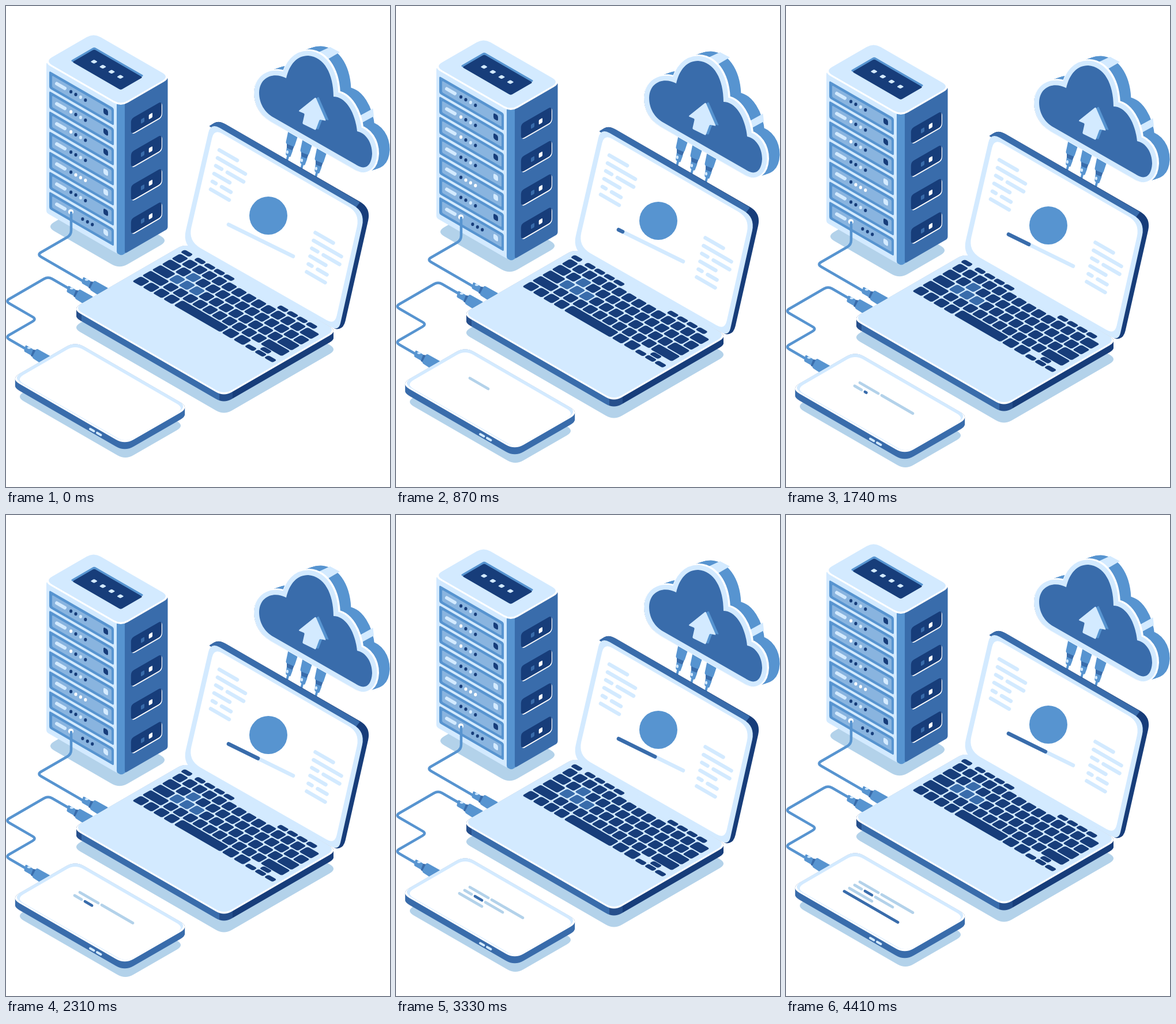
Recreate the animation shown at these times as an HTML page. Size 666 by 833 pixels, loop 4.5 s.

```html
<!DOCTYPE html>
<html lang="en">
<head>
<meta charset="utf-8">
<title>Cloud backup</title>
<style>
@property --t { syntax: "<number>"; inherits: true; initial-value: 0; }
html, body { margin: 0; width: 100%; height: 100%; overflow: hidden; background: #fff; }
svg { display: block; width: 666px; height: 833px; }
#scene { animation: bob 4.5s infinite, clock 4.5s linear infinite; }
.line { fill: none; stroke-linecap: round; stroke-linejoin: round; }
.type, .load { stroke-dasharray: 1 2; }
.type { stroke-dashoffset: calc(1.1 * (1 - clamp(0, (var(--t) - var(--start)) / 150, 1))); }
.load { stroke-dashoffset: 1.1; animation: load 4.5s linear infinite; }
@keyframes clock { from { --t: 0; } to { --t: 4500; } }
/* moves in whole pixels */
@keyframes bob {
  0% { transform: translateY(0); animation-timing-function: step-end; }
  1.333% { transform: translateY(1px); animation-timing-function: steps(19, end); }
  43.556% { transform: translateY(20px); animation-timing-function: step-end; }
  47.222% { transform: translateY(19px); animation-timing-function: steps(19, end); }
  97.889%, 100% { transform: translateY(0); }
}
@keyframes load {
  0%, 15.3% { stroke-dashoffset: 1.1; }
  15.4% { stroke-dashoffset: 1; }
  27.33% { stroke-dashoffset: .812; }
  51.33% { stroke-dashoffset: .545; }
  64.67% { stroke-dashoffset: .482; }
  75.3%, 100% { stroke-dashoffset: .429; }
}
</style>
</head>
<body>
<svg viewBox="0 0 666 833" xmlns="http://www.w3.org/2000/svg">
  <defs>
    <linearGradient id="side" gradientUnits="userSpaceOnUse" x1="121" x2="567" y1="0" y2="0">
      <stop offset=".022" stop-color="#264f8c"/><stop offset=".022" stop-color="#396cab"/>
      <stop offset=".558" stop-color="#396cab"/><stop offset=".558" stop-color="#264f8c"/>
      <stop offset=".61" stop-color="#264f8c"/><stop offset=".61" stop-color="#173d7a"/>
    </linearGradient>
    <path id="cloud" d="M486 125C492 100 505 86 524 86C552 88 568 118 568 157C590 157 606 186 609 217C624 220 635 236 635 256C634 276 624 284 611 277L464 193C448 184 439 168 439 150C440 122 465 114 486 125Z"/>
  </defs>
  <g id="scene"></g>
</svg>
<script>
const WHITE = '#fff', LIGHT = '#d3eaff', MID = '#5794d0', BLUE = '#396cab',
  DARK = '#173d7a', SHADE = '#b3d2ea', PANEL = '#89b4df', ISO = .577;
let layer = document.getElementById('scene');

function add(tag, attrs) {
  const node = document.createElementNS('http://www.w3.org/2000/svg', tag);
  for (const k in attrs) node.setAttribute(k, attrs[k]);
  layer.appendChild(node);
  return node;
}

function group(x, y, draw) {
  const parent = layer;
  layer = add('g', { transform: `translate(${x} ${y})` });
  draw();
  layer = parent;
}

function repeat(n, dx, dy, draw) {
  for (let i = 0; i < n; i++) group(i * dx, i * dy, () => draw(i));
}

// Path with rounded corners; a point may carry its own radius.
function rounded(pts, r, open = false) {
  const n = pts.length;
  const toward = (p, q, d) => {
    const k = Math.min(d / Math.hypot(q[0] - p[0], q[1] - p[1]), .5);
    return (p[0] + (q[0] - p[0]) * k) + ' ' + (p[1] + (q[1] - p[1]) * k);
  };
  return pts.map((p, i) => {
    const cmd = i ? 'L' : 'M', rad = p[2] ?? r;
    if (open && (i === 0 || i === n - 1)) return `${cmd}${p[0]} ${p[1]}`;
    return `${cmd}${toward(p, pts[(i + n - 1) % n], rad)}Q${p[0]} ${p[1]} ${toward(p, pts[(i + 1) % n], rad)}`;
  }).join('') + (open ? '' : 'Z');
}

const poly = (fill, r, pts) => add('path', { d: rounded(pts, r), fill });

// Upright parallelogram on a wall of slope s.
const slab = (fill, x, y, w, h, s, r) =>
  poly(fill, r, [[x, y], [x + w, y + w * s], [x + w, y + w * s + h], [x, y + h]]);

// Lying rectangle: top corner, reach to the right, reach to the left.
const tile = (fill, x, y, a, b, r) =>
  poly(fill, r, [[x, y], [x + a, y + a * ISO], [x + a - b, y + (a + b) * ISO], [x - b, y + b * ISO]]);

// Lit tile with a white front edge.
function lid(x, y, a, b, r) {
  tile(WHITE, x, y, a, b, r);
  tile(LIGHT, x, y, a - 3, b - 3, r);
}

const line = (stroke, width, d, cls = '') =>
  add('path', { class: 'line ' + cls, d, stroke, 'stroke-width': width, pathLength: 1 });

const isoLine = (stroke, width, x, y, len, cls) =>
  line(stroke, width, `M${x} ${y}l${len} ${len * ISO}`, cls);

const dot = (fill, cx, cy, rx, ry = rx) => add('ellipse', { cx, cy, rx, ry, fill });

// Zigzag along the isometric axes through the given x positions.
function cable(x, y, turns, first) {
  const pts = [...first, [x, y]];
  turns.forEach(to => { y += Math.abs(to - x) * ISO; x = to; pts.push([x, y]); });
  line(MID, 4.5, rounded(pts, 8, true));
}

function plug(x, y) {
  group(x, y, () => {
    poly(MID, 2, [[134, 469], [148, 477], [145, 488], [131, 480]]);
    poly(BLUE, 0, [[147, 477], [154, 478], [148, 491], [143, 488]]);
    poly(MID, 3, [[153, 475], [178, 489], [160, 501], [145, 491]]);
    dot(LIGHT, 140, 474, 3.2, 1.8);
  });
}

function server() {
  tile(SHADE, 155, 333, 127, 85, 16);
  slab(LIGHT, 70, 97, 124, 261, ISO, 4);
  poly(MID, 3, [[192, 160], [208, 160], [208, 428], [200, 432], [192, 428]]);
  slab(BLUE, 206, 166, 74.5, 263, -ISO, 4);
  lid(152, 47, 134, 87, 14);
  tile(MID, 153, 71, 86, 41, 3);
  tile(DARK, 153, 75, 84, 38, 3);
  repeat(4, 15.2, 8.75, () => tile(LIGHT, 152.7, 92.8, 6.2, 6.2, 1.5));

  const leds = ['ddld', 'wdld', 'wdld', 'ddld', 'dwww', 'ddld', ' ddd'];
  const tone = { d: DARK, l: LIGHT, w: WHITE };
  repeat(7, 0, 34.8, row => {
    slab(MID, 75, 112.5, 112, 30, ISO, 3);
    slab(PANEL, 80, 120.5, 103, 20, ISO, 2);
    isoLine(LIGHT, 6, 88, 134.5, 14);
    const x = row < 6 ? 112.6 : 124.5, y = 148.5 + (x - 112.6) * ISO;
    [...leds[row]].forEach((c, k) => c in tone && dot(tone[c], x + k * 8.4, y + k * 4.8, 2.6, 3));
    slab(row === 5 || row < 3 ? DARK : LIGHT, 169, 176, 8, 10, ISO, 3);
  });

  repeat(4, 0, 57.8, () => {
    slab(WHITE, 218, 196.5, 53, 27, -ISO, 7);
    slab(DARK, 216.8, 195.5, 53, 26.5, -ISO, 6);
    slab(BLUE, 234, 196.5, 6, 7.5, -ISO, 1.5);
    slab(WHITE, 247.7, 188.5, 6.3, 8, -ISO, 1.5);
  });
}

function cables() {
  dot(WHITE, 112.5, 356.5, 4.6);
  cable(113, 396.5, [54, 138], [[113, 358]]);
  cable(73, 468.5, [-1, 53, -1, 38], [[112, 491]]);
  plug(0, 0);
  plug(-26, 15);
  plug(-100, 118);
}

function keyboard() {
  const end = 242, pitch = 17;
  const key = (a, b, w, h = 15, fill = DARK) =>
    tile(fill, 312 + a - b, 423 + ISO * (a + b), w, h, 3.5);
  const small = (a, b) => key(a, b, 14.7, 7.5);

  small(-2, 0);
  for (let i = 0; i < 4; i++) {
    small(21 + i * 16.7, 0);
    small(164.5 + i * 16.7, 0);
    key(i * 17.8, 78, 15.5);
  }
  for (let row = 0; row < 4; row++) {
    const b = 10 + row * pitch, first = 14.5 + row * 6, count = 12 - Math.max(0, row - 1);
    let a = first + 2.5;
    key(0, b, first);
    for (let i = 0; i < count; i++, a += pitch) {
      const lit = row === 1 && i === 1 || row === 2 && i < 3;
      key(a, b, 14.8, 15, lit ? BLUE : DARK);
    }
    key(a, b, end - a);
  }
  key(72, 78, 80.5);
  key(155, 78, 17);
  key(175, 78, 17);
  for (let i = 0; i < 3; i++) small(195 + i * pitch, 86);
  small(212, 77);
}

function paragraph() {
  [[31], [48], [10, 28], [27], [6, 16], [32]].forEach((words, row) => {
    let x = 370 - row * 3, y = 249.5 + row * 13.6;
    words.forEach(len => {
      isoLine(LIGHT, 6.5, x, y, len);
      x += len + 10;
      y += (len + 10) * ISO;
    });
  });
}

function laptop() {
  const base = [312, 411, 263, 197, 16];
  group(0, 32, () => tile(SHADE, ...base));
  repeat(13, 0, 1, () => tile('url(#side)', ...base));
  lid(...base);
  keyboard();

  poly(DARK, 8, [[354, 207, 4], [369, 198, 14], [633, 350, 22], [586, 557, 12], [570, 561]]);
  poly(BLUE, 2, [[352, 208], [369, 198, 14], [614, 340], [606, 350]]);
  poly(LIGHT, 20, [[355, 202, 18], [623, 357, 24], [577, 563, 14], [306, 414, 26]]);
  poly(WHITE, 20, [[361, 213, 16], [614, 359, 24], [570, 552, 16], [316, 407, 24]]);

  paragraph();
  group(166.5, 143, paragraph);
  dot(MID, 455, 363, 33);
  const bar = 'M386 378.5L498 433.5';
  line(LIGHT, 6.5, bar);
  line(BLUE, 6.5, bar, 'load');
}

function phone() {
  const body = [120, 581, 198, 112, 18], screen = [120, 587, 190, 103, 16];
  group(0, 30, () => tile(SHADE, ...screen));
  repeat(13, 0, 1, () => tile(BLUE, ...body));
  lid(...body);
  tile(WHITE, ...screen);
  repeat(2, 12, 6.7, () => isoLine(LIGHT, 4, 146, 732.5, 6.5));

  // rows of words: [length, time it is typed]
  [
    [[32, 660], [54, 1000]],
    [[12, 1350], [12, 1700], [30, 2550]],
    [[39, 3100]],
    [[93, 3840]]
  ].forEach((words, row) => {
    let x = 128 - row * 9, y = 635.5 + row * 5.4;
    words.forEach(([len, start], i) => {
      const accent = row === 3 || row === 1 && i === 1;
      isoLine(accent ? BLUE : SHADE, 4.8, x, y, len, 'type').style.setProperty('--start', start);
      x += len + 6;
      y += (len + 6) * ISO;
    });
  });
}

function cloudCables() {
  repeat(3, 25, 14.3, () => {
    line(MID, 4, 'M490 257L486 272');
    poly(MID, 2, [[487, 244], [498, 249], [493, 262], [485, 258]]);
    poly(BLUE, 1, [[487, 237], [500, 242], [497, 250], [487, 246]]);
    poly(MID, 3, [[490, 214], [507, 223], [500, 244], [485, 238]]);
    dot(LIGHT, 488, 253, 2, 3);
  });
}

function cloud() {
  const shape = (fill, width) => add('use', {
    href: '#cloud', fill, stroke: fill, 'stroke-width': width, 'stroke-linejoin': 'round'
  });
  repeat(13, 1.8, -.62, () => shape(MID, 18));
  poly(LIGHT, 0, [[538, 82], [562, 71], [579, 80], [555, 94]]);
  poly(LIGHT, 0, [[610, 192], [636.5, 177.5], [638, 191], [614, 204]]);
  group(1.5, -.5, () => shape(WHITE, 21));
  shape(LIGHT, 17);
  shape(BLUE, 0);
  const arrow = [[537, 158], [555, 199], [544, 196.5], [537, 215], [514, 204], [518, 186.5], [507, 182]];
  group(5, -1, () => poly(MID, 2, arrow));
  poly(LIGHT, 2, arrow);
}

server();
cables();
cloudCables();
laptop();
phone();
cloud();
</script>
</body>
</html>
```
